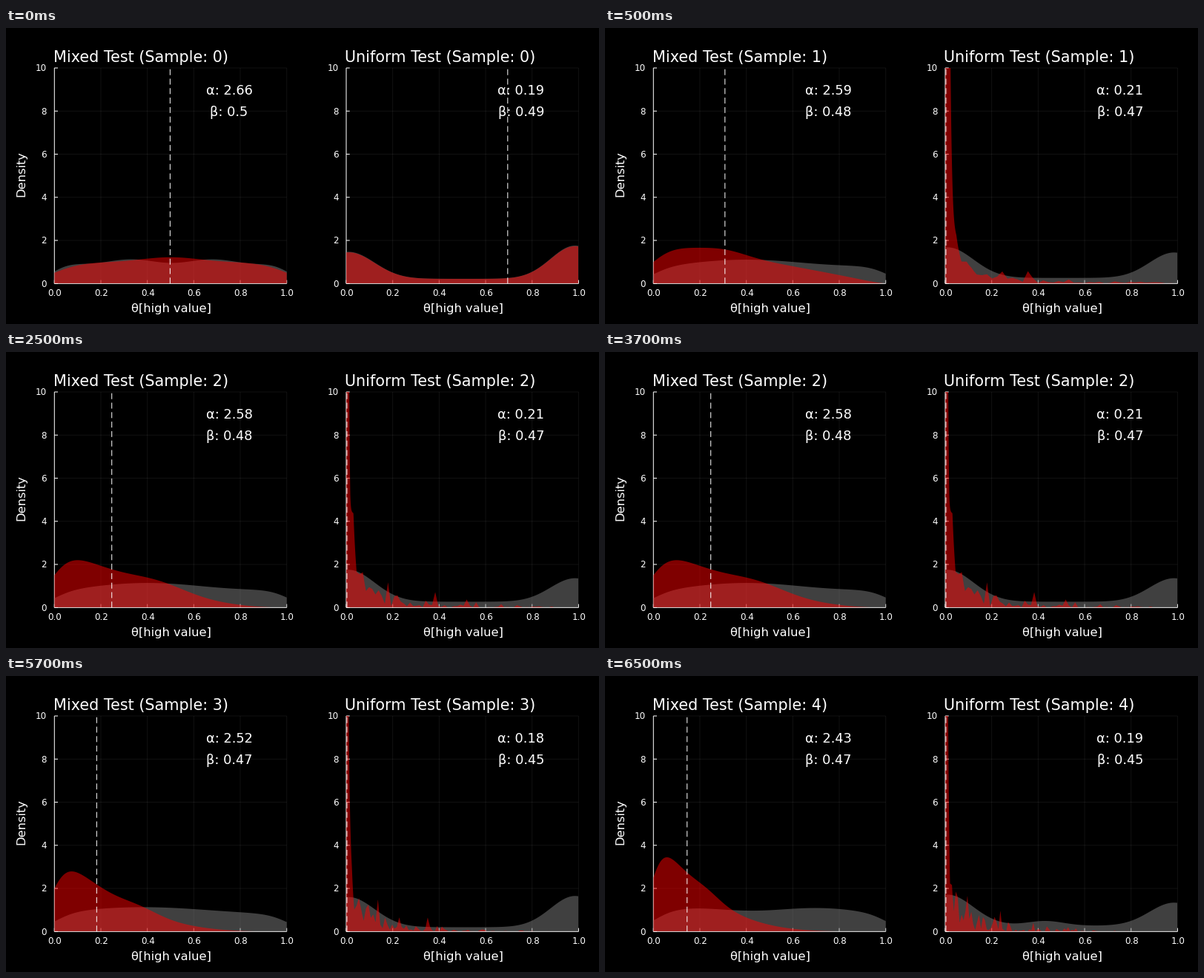
A matplotlib script for the animation above (8000 ms loop, 800 by 400 pixels).

```python
import numpy as np
import matplotlib.pyplot as plt
from matplotlib.animation import FuncAnimation

W, H, DPI = 800, 400, 100
TOP, BOTTOM, PANEL_W = 54, 345.3, 313.4
LEFTS = (65.3, 459)
FONT = "DejaVu Sans"
X = np.linspace(0, 1, 1200)


def bump(center, width, height):
    return height * np.exp(-((X - center) / width) ** 2 / 2)


def edges(width):
    """Soft fall to one half at both ends, as a kernel density has."""
    rise = (1 + np.tanh(X / width)) / 2
    return rise * rise[::-1]


def mixed_prior(level, amount, peak, period):
    wave = np.cos(2 * np.pi * (X - peak) / period)
    return level * (1 + amount * wave) * edges(.09)


def mixed_posterior(n, ripple):
    """Density after n low values in a row, plus one sampling ripple."""
    return (n + 1) * (1 - X) ** n * edges(.12 - .015 * n) + bump(*ripple)


def uniform_prior(low, high, floor):
    return floor + bump(.01, .111, low) + bump(.985, .105, high)


def uniform_posterior(n):
    """A spike at zero with a 1/x tail that gets rougher as samples thin out."""
    rng = np.random.default_rng(n)
    knots = np.arange(.004, 1, .022 * n ** -.7)
    shape = .8 / n / knots
    rough = np.interp(X, knots, rng.gamma(shape) / shape)
    tail = .09 / np.maximum(X, .004) * (1 - X) ** (n / 2)
    return tail * rough + 30 * np.exp(-(X * n / .018) ** 2)


uniform_priors = [uniform_prior(*p) for p in (
    (1.25, 1.54, .22), (1.42, 1.18, .26), (1.48, 1.09, .27),
    (1.40, 1.45, .20), (1.44, 1.07, .27))]
uniform_priors[4] += bump(.43, .08, .22)

TESTS = [
    dict(name="Mixed", mean=[.498, .308, .247, .182, .145],
         alpha=[2.66, 2.59, 2.58, 2.52, 2.43], beta=[.5, .48, .48, .47, .47],
         prior=[mixed_prior(*p) for p in (
             (1.04, .08, .33, .35), (.98, .13, .40, .9), (1, .14, .40, .9),
             (1, .13, .38, 1.1), (1.03, .06, .15, .55))],
         posterior=[mixed_posterior(n, p) for n, p in enumerate((
             (.5, .12, .22), (.31, .09, .2), (.45, .12, .34),
             (.37, .08, .2), (.23, .06, .25)))]),
    dict(name="Uniform", mean=[.695, .003, .003, .003, .003],
         alpha=[.19, .21, .21, .18, .19], beta=[.49, .47, .47, .45, .45],
         prior=uniform_priors,
         posterior=[uniform_priors[0] * .985] + [uniform_posterior(n) for n in range(1, 5)]),
]

fig = plt.figure(figsize=(W / DPI, H / DPI), dpi=DPI, facecolor="black")


def px(size):
    return size * 72 / DPI


def label(x, y, text, size, ha="center", **kw):
    """Text at pixel x with its baseline at pixel y."""
    return fig.text(x / W, 1 - y / H, text, fontsize=px(size), family=FONT,
                    color="white", ha=ha, va="baseline", **kw)


def area(density):
    return np.column_stack([np.r_[0, X, 1], np.r_[0, density, 0]])


class Panel:
    def __init__(self, left, test):
        self.test = test
        ax = fig.add_axes([left / W, 1 - BOTTOM / H, PANEL_W / W, (BOTTOM - TOP) / H])
        ax.set(xlim=(0, 1), ylim=(0, 10))
        ax.axis("off")

        def line(xs, ys, **kw):
            return ax.plot(xs, ys, color="white", lw=px(1), clip_on=False,
                           solid_capstyle="butt", snap=False, **kw)[0]

        for k in range(6):
            u, v = k / 5, 2 * k
            line([u, u], [0, 10], alpha=.07, zorder=1)
            line([0, 1], [v, v], alpha=.07, zorder=1)
            line([u, u], [0, .16], zorder=1.5)
            line([0, .015], [v, v], zorder=1.5)
            label(left + u * PANEL_W + .5, 362.5, f"{u:.1f}", 11.9)
            label(left - 10.5, BOTTOM - k * (BOTTOM - TOP) / 5 + 4.4, str(v), 11.9, ha="right")
        line([0, 1], [0, 0], zorder=1.5)
        line([0, 0], [0, 10], zorder=1.5)

        self.prior, = ax.fill([0, 1], [0, 0], color="#808080", alpha=.5, lw=0, zorder=2)
        self.posterior, = ax.fill([0, 1], [0, 0], color="red", alpha=.5, lw=0, zorder=3)
        self.mean = line([0, 0], [0, 10], dashes=(8, 4.8), zorder=4)

        label(left + PANEL_W / 2 + .8, 384.4, "θ[high value]", 16.3)
        self.title = label(left - 1.7, 46.4, "", 20.8, ha="left")
        self.alpha = label(left + .75 * PANEL_W + .7, 89.7, "", 17.8)
        self.beta = label(left + .75 * PANEL_W + .7, 118.8, "", 17.8)

    def show(self, n):
        t = self.test
        self.prior.set_xy(area(t["prior"][n]))
        self.posterior.set_xy(area(t["posterior"][n]))
        self.mean.set_xdata([t["mean"][n]] * 2)
        self.title.set_text(f"{t['name']} Test (Sample: {n})")
        self.alpha.set_text(f"α: {t['alpha'][n]}")
        self.beta.set_text(f"β: {t['beta'][n]}")


panels = [Panel(left, test) for left, test in zip(LEFTS, TESTS)]
label(25, 197.5, "Density", 16.3, rotation=90, rotation_mode="anchor")


def update(frame):
    # The first sample lasts half a second, the others two seconds each
    for panel in panels:
        panel.show((frame + 3) // 4)


anim = FuncAnimation(fig, update, frames=16, interval=500, repeat=True,
                     repeat_delay=0, init_func=lambda: update(0))
plt.show()
```
